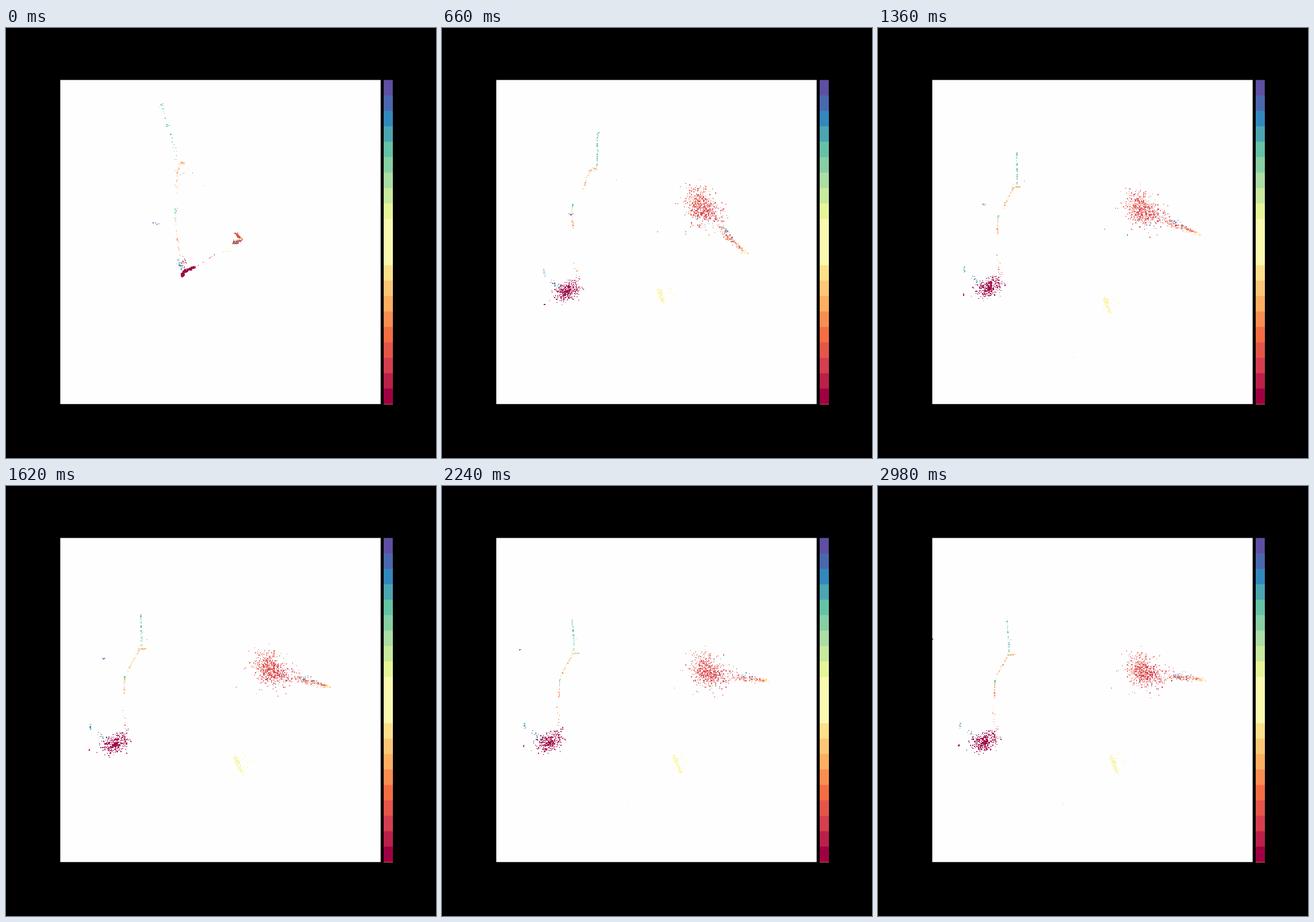
Recreate the animation shown at these times as an HTML page with a canvas. Size 748 by 748 pixels, loop 3030 ms.

```html
<!DOCTYPE html>
<html lang="en">
<head>
<meta charset="utf-8">
<title>Embedding</title>
<style>
html, body { margin: 0; width: 100%; height: 100%; overflow: hidden; background: #000; }
canvas { display: block; }
</style>
</head>
<body>
<canvas id="stage" width="748" height="748"></canvas>
<script>
const ctx = document.getElementById('stage').getContext('2d');
const LOOP = 3030, STEP = 20, END = 2980;
const LEFT = 94.4, TOP = 90.4, RIGHT = 651.7, BOTTOM = 654.2, CELL = 1.4;
const SLOW = 480, FAST = 300, STEADY = 1e5;

const [PURPLE, INDIGO, BLUE, CYAN, TEAL, MINT, GREEN, LIME, LEMON, CREAM, SAND, AMBER,
  ORANGE, CORAL, RED, SCARLET, CRIMSON, WINE, MAROON] = [
  '#5e4fa2', '#4a68ae', '#3288bd', '#4ca5b1', '#66c2a5', '#88cfa4', '#abdda4', '#c8e99e',
  '#e6f598', '#fbf8b0', '#fee08b', '#fdc776', '#fdae61', '#f98e52', '#f46d43', '#e55649',
  '#d53e4f', '#ba2049', '#9e0142'];
const BAR = [PURPLE, INDIGO, BLUE, CYAN, TEAL, MINT, GREEN, LIME, LEMON, CREAM, CREAM, CREAM,
  SAND, AMBER, ORANGE, CORAL, RED, SCARLET, CRIMSON, WINE, MAROON];

let seed = 7;
function random() {
  seed = (seed * 1664525 + 1013904223) % 4294967296;
  return seed / 4294967296;
}
const gauss = () => (random() + random() + random() + random() - 2) * 1.73 * (0.5 + random());
const lerp = (a, b, u) => a + (b - a) * u;

// Position at s (0..1) on a polyline of flat x, y pairs.
function along(path, s) {
  const last = path.length / 2 - 1;
  if (!last) return path;
  const i = Math.min(last - 1, Math.floor(s * last)), u = s * last - i;
  return [lerp(path[2 * i], path[2 * i + 2], u), lerp(path[2 * i + 1], path[2 * i + 3], u)];
}

const dots = [];
// Dots run from one polyline to another, swerving by `bend` on the way.
// `mix` 0 orders the colours along the line, 1 shuffles them; `taper` narrows the far end.
function add(count, colors, { from, to, bend = [0, 0], spread, tau = SLOW, mix = 1, taper = 0 }) {
  for (let i = 0; i < count; i++) {
    const s = random(), narrow = 1 - taper * s;
    dots.push({
      a: along(from, s), b: along(to, s), bend: along(bend, s), spread, tau,
      color: colors[Math.floor(lerp(s, random(), mix) * colors.length)],
      scatter: [gauss() * narrow, gauss() * narrow]
    });
  }
}

// pale cluster
add(150, [CREAM, CREAM, CREAM, CREAM, SAND], {
  from: [409, 367, 405, 370], to: [406, 472, 410, 483, 418, 500], bend: [-30, 10], spread: [0.8, 2.4] });
add(12, [CREAM], { from: [387, 385], to: [419, 468, 427, 485], bend: [-14, 8], spread: [4, 5] });
add(2, [CREAM, SAND], { from: [378, 389], to: [322, 553], bend: [42, 52], spread: [1, 0.4], tau: FAST });

// red cluster, its tail and tip
add(290, [SCARLET, SCARLET, RED, SCARLET, CRIMSON], {
  from: [400, 358, 409, 367, 409, 368], to: [452, 306, 458, 327], bend: [-4, -22], spread: [0.9, 11], tau: FAST });
add(350, [CRIMSON, CRIMSON, CRIMSON, SCARLET], {
  from: [409, 367, 407, 369, 396, 375], to: [452, 322, 470, 325, 493, 336], bend: [-5, -13],
  spread: [0.9, 10], tau: FAST });
add(14, [CYAN, TEAL, WINE, BLUE], { from: [400, 372], to: [467, 332], bend: [-5, -10], spread: [2, 17], tau: FAST });
add(115, [CRIMSON, SCARLET, RED, SCARLET, CORAL, RED], {
  from: [407, 368, 403, 372, 395, 376], to: [506, 331, 530, 333, 564, 336], bend: [-14, 8, -21, 48],
  spread: [1.2, 4.5], tau: FAST, mix: 0.75, taper: 0.85 });
add(24, [TEAL, BLUE, ORANGE, WINE, SAND, INDIGO], {
  from: [404, 371, 394, 376], to: [514, 329, 546, 332], bend: [-15, 10, -20, 40],
  spread: [2, 4.5], tau: FAST, taper: 0.5 });
add(20, [ORANGE, SAND, CREAM, SAND], {
  from: [405, 367, 409, 368], to: [558, 336, 568, 337], bend: [-21, 50], spread: [1, 1.8], tau: FAST });
add(7, [WINE, CRIMSON], { from: [325, 418, 382, 384], to: [461, 326, 482, 335], spread: [0.6, 6] });
add(1, [CRIMSON], { from: [363, 393], to: [406, 351], bend: [-20, -8], spread: [0, 0] });

// dark cluster with its satellites
add(390, [MAROON], {
  from: [307, 432, 310, 424, 314, 422, 328, 416], to: [172, 445, 182, 446, 188, 445, 204, 434],
  bend: [0, 19], spread: [1.1, 6.8] });
add(14, [MAROON, CRIMSON, CYAN, MAROON], { from: [309, 412], to: [184, 450], bend: [0, 19], spread: [5, 10] });
add(8, [MAROON], { from: [308, 430], to: [141, 451], bend: [-5, 36], spread: [1, 1] });
add(14, [TEAL, CYAN, BLUE, BLUE], {
  from: [299, 403, 304, 419], to: [143, 413, 142, 420], bend: [-5, 10], spread: [1.2, 0.9], mix: 0.3 });
add(14, [INDIGO, PURPLE, BLUE, CYAN, TEAL], {
  from: [300, 408, 310, 421], to: [152, 426, 176, 440], bend: [-4, 18], spread: [2, 2], mix: 0.3 });

// thin branch on the left
add(8, [CRIMSON, CORAL, ORANGE, CORAL], {
  from: [302, 382, 309, 415], to: [200, 378, 204, 419], bend: [6, 25], spread: [2, 1.8], mix: 0.7 });
add(30, [GREEN, TEAL, LIME, CORAL, CORAL, RED], {
  from: [296, 309, 294, 338, 301, 387], to: [204, 336, 203, 348, 203, 368], bend: [0, -26],
  spread: [1, 0.5], mix: 0.25 });
add(38, [GREEN, SAND, CORAL, ORANGE, ORANGE, AMBER], {
  from: [297, 285, 299, 247, 306, 233, 309, 237], to: [205, 333, 216, 313, 226, 295, 238, 293],
  bend: [18, -42, 14, -33], spread: [2, 0.6], mix: 0.4 });
add(8, [ORANGE, AMBER, GREEN, TEAL], { from: [310, 245], to: [229, 291], bend: [10, -33], spread: [6, 2.2] });
add(34, [TEAL, TEAL, TEAL, CYAN, TEAL, MINT], {
  from: [270, 129, 276, 151, 290, 196, 298, 232], to: [224, 233, 225, 245, 227, 267, 228, 291],
  bend: [37, -27, 24, -33], spread: [2.2, 0.4], mix: 0.6 });
add(5, [PURPLE, PURPLE, INDIGO], { from: [254, 339, 266, 341], to: [94, 267], spread: [0.8, 0.9], tau: STEADY });
add(1, [TEAL], { from: [345, 275], to: [230, 268], bend: [45, -5], spread: [0, 0] });

// Exponential approach that arrives exactly at END.
const settle = (t, tau) => Math.expm1(-t / tau) / Math.expm1(-END / tau);
// Rises to 1 at 600 ms, then fades.
const swell = t => (t / 600 * Math.exp(1 - t / 600)) ** 2;

function drawDot(x, y) {
  const snap = (v, origin) => origin + Math.floor((v - origin) / CELL) * CELL;
  const left = snap(Math.max(x, LEFT), LEFT), top = snap(y, TOP);
  const x0 = Math.round(left), y0 = Math.round(top);
  ctx.fillRect(x0, y0, Math.round(left + CELL) - x0, Math.round(top + CELL) - y0);
}

function drawBackground() {
  ctx.fillStyle = '#000';
  ctx.fillRect(0, 0, 748, 748);
  ctx.fillStyle = '#fefefe';
  ctx.fillRect(LEFT, TOP, RIGHT - LEFT, BOTTOM - TOP);
  BAR.forEach((color, i) => {
    const top = lerp(TOP, BOTTOM, i / BAR.length);
    ctx.fillStyle = color;
    ctx.fillRect(657, top, 15.8, BOTTOM - top);
  });
}

function draw(time) {
  const t = Math.min(END, Math.floor(time / STEP) * STEP);
  const swerve = swell(t), grown = Math.sqrt(Math.min(1, t / 440));
  drawBackground();
  ctx.globalAlpha = 0.88;
  for (const { a, b, bend, spread, tau, color, scatter } of dots) {
    const u = settle(t, tau), reach = lerp(...spread, grown);
    const [x, y] = [0, 1].map(i => lerp(a[i], b[i], u) + bend[i] * swerve + scatter[i] * reach);
    ctx.fillStyle = color;
    drawDot(x, y);
  }
  ctx.globalAlpha = 1;
}

const start = performance.now();
function tick() {
  draw((performance.now() - start) % LOOP);
  requestAnimationFrame(tick);
}
tick();
</script>
</body>
</html>
```
